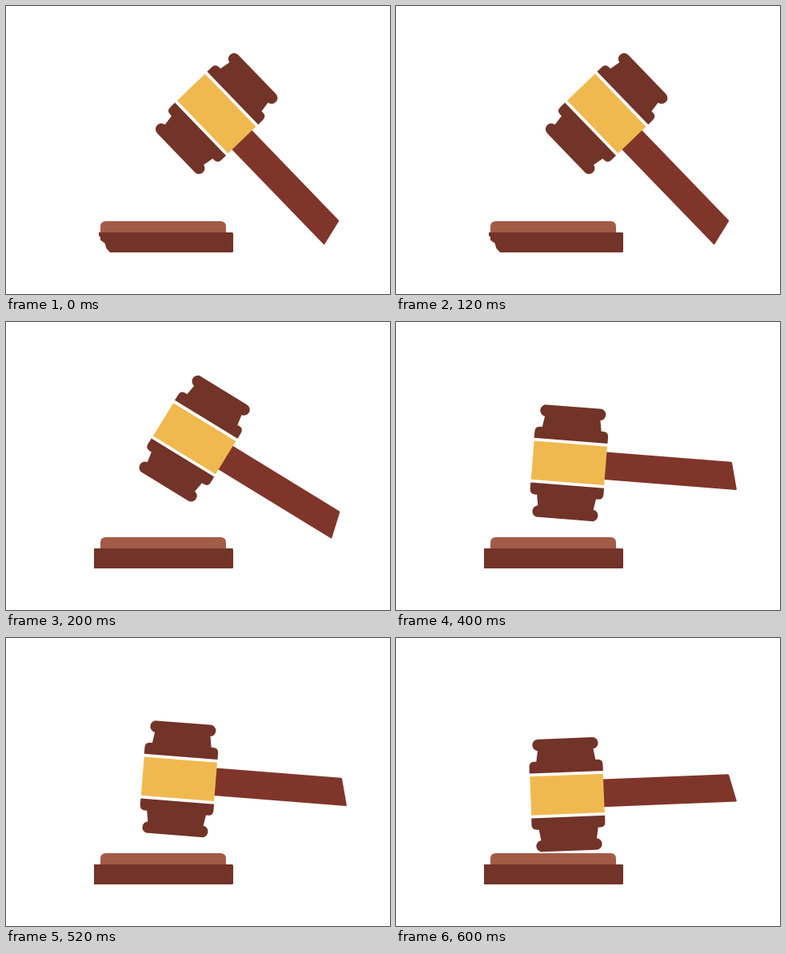
An HTML page for the animation above (800 ms loop, 480 by 360 pixels).

```html
<!DOCTYPE html>
<html lang="en">
<head>
<meta charset="utf-8">
<title>Gavel</title>
<style>
  html, body { margin: 0; width: 100%; height: 100%; overflow: hidden; background: #fff; }
  svg { display: block; width: 100%; height: 100%; }
</style>
</head>
<body>
<svg viewBox="0 0 480 360">
  <defs>
    <!-- upper half of the head, mirrored for the lower half -->
    <path id="cap" d="M-46 -28V-36Q-46 -42.3 -40 -42.5H-37L-34.8 -56
      A7.2 7.2 0 0 1 -33 -70.4H33A7.2 7.2 0 0 1 34.8 -56
      L37 -42.5H40Q46 -42.3 46 -36V-28Z"/>
  </defs>
  <path d="M118 284V276Q118 269 125 269H268Q275 269 275 276V284Z" fill="#a25b46"/>
  <path id="block" fill="#723328"/>
  <g id="gavel">
    <path d="M45 -17.3H201.5Q202.8 -17.3 203.1 -16L211.3 16Q211.6 17.3 210.3 17.3H45Z" fill="#80352a"/>
    <g fill="#723328">
      <use href="#cap"/>
      <use href="#cap" transform="scale(1 -1)"/>
    </g>
    <rect x="-45.8" y="-24.2" width="91.6" height="48.4" fill="#f0b950"/>
  </g>
</svg>
<script>
  const STEP = 200;
  // head centre and tilt for each step of the swing
  const poses = [
    { x: 263.2, y: 134.5, tilt: 46 },
    { x: 235.6, y: 145.7, tilt: 31.5 },
    { x: 216.4, y: 176.2, tilt: 4.5 },
    { x: 214, y: 195.7, tilt: -2.3 }
  ];
  const right = 'H282.5Q284 283 284 284.5V306.5Q284 308 282.5 308';
  const whole = `M110 283${right}H110Z`;
  const chipped = `M116 283${right}H130L125.5 303L123.5 296.5L118 292.5V289L116 287Z`;

  const gavel = document.getElementById('gavel');
  const block = document.getElementById('block');

  function draw(ms) {
    const i = Math.floor(ms / STEP) % poses.length;
    const { x, y, tilt } = poses[i];
    gavel.setAttribute('transform', `translate(${x} ${y}) rotate(${tilt})`);
    block.setAttribute('d', i === 0 ? chipped : whole);
  }

  const start = performance.now();
  function tick() {
    draw(performance.now() - start);
    requestAnimationFrame(tick);
  }
  tick();
</script>
</body>
</html>
```
